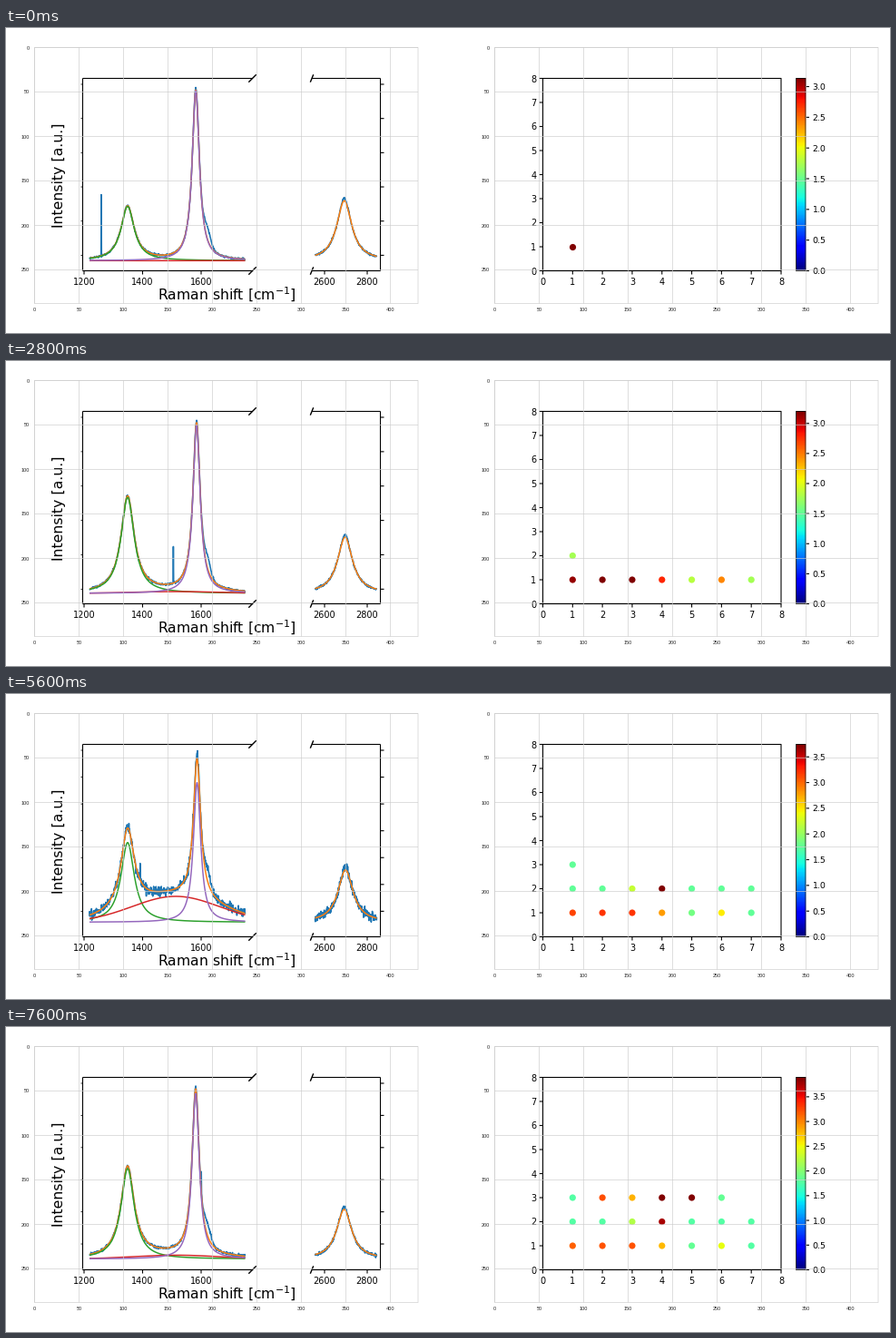
A matplotlib script that plays this animation: 974x336 px, repeating every 8 s.

```python
import numpy as np
import matplotlib.pyplot as plt
from matplotlib.animation import FuncAnimation

W, H, DPI = 974, 336, 100
FRAMES, INTERVAL = 20, 400
PX = 72 / DPI
TOP, BOTTOM = 55.5, 267.5
COLS = 7

# Regions of a high peak ratio: column, row, rise, half width
GRAINS = [(2.3, 1, 1.45, 1.9), (6, 1, 0.7, 0.5), (3.7, 2, 2.0, 0.6),
          (2.4, 3, 1.5, 0.65), (4.5, 3, 2.15, 1.0)]

fig = plt.figure(figsize=(W / DPI, H / DPI), dpi=DPI, facecolor="white")
ax = fig.add_axes([0, 0, 1, 1])


def line(x, y, color="black", width=1.1, z=3, **kw):
    ax.plot(x, y, color=color, lw=width * PX, zorder=z, snap=False,
            solid_capstyle="butt", solid_joinstyle="round", **kw)


def box(x0, x1, y0, y1, **kw):
    line([x0, x1, x1, x0, x0], [y0, y0, y1, y1, y0], **kw)


def label(x, y, text, size=9.8, ha="center", font="DejaVu Sans", **kw):
    ax.text(x, y, text, fontsize=size * PX, ha=ha, family=font, zorder=4,
            va=kw.pop("va", "center_baseline"), **kw)


def lorentz(x, center, height, half_width):
    return height / (1 + ((x - center) / half_width) ** 2)


def gauss(x, center, height, sd):
    return height * np.exp(-((x - center) / sd) ** 2 / 2)


def cell(n):
    return n % COLS + 1, n // COLS + 1


def peak_ratio(n):
    """Height ratio of the two main peaks at the n-th map position."""
    col, row = cell(n)
    return 1.75 + sum((row == r) * rise / (1 + ((col - c) / half) ** 8)
                      for c, r, rise, half in GRAINS)


def outer_panel(x0):
    x1, y0, y1 = x0 + 422.5, 21.5, 303.5
    grid = dict(color="#cccccc", width=0.8, z=6, alpha=0.8)
    small = dict(size=5.5, font="Liberation Sans", color="#262626")
    box(x0, x1, y0, y1, **grid)
    for v in range(0, 401, 50):
        x, y = x0 + 0.98 * v, y0 + 0.98 * v
        line([x, x], [y0, y1], **grid)
        label(x, 310.5, str(v), **small)
        if y < y1:
            line([x0, x1], [y, y], **grid)
            label(x0 - 6, y, str(v), ha="right", **small)


def spectrum_axes(tick_step):
    for x0, x1, slash_x, dx in ((84.5, 271.5, 271.5, 4.2),
                                (337, 412.5, 337, 1.7)):
        for y in (TOP, BOTTOM):
            line([x0, x1], [y, y])
            line([slash_x - dx, slash_x + dx], [y + 4.2, y - 4.2], width=1.4)
    for x in (84.5, 412.5):
        line([x, x], [TOP, BOTTOM])
    for y in np.arange(62, BOTTOM, tick_step):
        line([412.5, 416.5], [y, y])
        line([82.5, 84.5], [y, y], width=0.8)
    for origin, start, scale, values in ((86, 1200, 0.3225, (1200, 1400, 1600)),
                                         (351, 2600, 0.235, (2600, 2800))):
        for v in values:
            x = origin + (v - start) * scale
            line([x, x], [BOTTOM, BOTTOM + 4])
            label(x, 279, str(v))
    label(58, 162.5, "Intensity [a.u.]", 15.7, rotation=90, va="center")
    label(243, 294, "Raman shift [cm$^{-1}$]", 15.6, va="center")


def spectrum(i, rng):
    # The broad background swells and fades, and brings noise with it.
    swell = gauss(i, 13.5, 29, 2.8)
    shift = 0.9 * np.sin(2 * np.pi * (i - 3.4) / 8.3)
    base = 256.3 - 0.17 * swell
    noise = 0.6 + 0.07 * swell
    g_x, two_d_x = 209.6 + shift, 373.2 + shift
    g_height = base - 69 - swell

    x = np.linspace(92, 263.5, 530)
    d = lorentz(x, 134, g_height / peak_ratio(i), 8.8)
    g = lorentz(x, g_x, g_height, 4.8)
    hump = gauss(x, 187, swell, 48)
    fit = d + g + hump
    excess = max(base - 66 - fit.max(), 0)
    raw = fit + gauss(x, 222, 14, 3.5) + gauss(x, g_x, excess, 2)

    x2 = np.linspace(340.5, 408.5, 290)
    fit2 = lorentz(x2, two_d_x, 66 - 0.6 * i, 10)
    raw2 = fit2 + gauss(x2, two_d_x, 2 + noise, 2.5)

    raw[rng.integers(30, 500)] += rng.uniform(15, 70)
    for xs, ys, model in ((x, raw, fit), (x2, raw2, fit2)):
        line(xs, base - ys - rng.normal(0, noise, xs.size), "tab:blue", 1.6)
        line(xs, base - model, "tab:orange", 1.5)
    for part, color in ((d, "green"), (hump, "red"), (g, "purple")):
        line(x, base - part, "tab:" + color, 1.5)


def ratio_map(i):
    x0, x1 = 591.5, 854
    dx, dy = (x1 - x0) / 8, (BOTTOM - TOP) / 8
    box(x0, x1, TOP, BOTTOM)
    for v in range(9):
        x, y = x0 + v * dx, BOTTOM - v * dy
        line([x, x], [BOTTOM, BOTTOM + 4])
        line([x0 - 4, x0], [y, y])
        label(x, 279, str(v))
        label(x0 - 7, y, str(v), ha="right")

    values = [peak_ratio(n) for n in range(i + 1)]
    vmax = max(values)
    col, row = cell(np.arange(i + 1))
    ax.scatter(x0 + col * dx, BOTTOM - row * dy, c=values, cmap="jet",
               vmin=0, vmax=vmax, s=(7.2 * PX) ** 2, linewidths=0, zorder=4)

    left, right = 870.5, 881
    ax.imshow(np.linspace(1, 0, 256)[:, None], cmap="jet", aspect="auto",
              extent=(left, right, BOTTOM, TOP), zorder=2)
    box(left, right, TOP, BOTTOM, width=0.8)
    for v in np.arange(0, vmax, 0.5):
        y = BOTTOM - (BOTTOM - TOP) * v / vmax
        line([right, right + 4], [y, y])
        label(888, y, f"{v:.1f}", 9.4, ha="left")


def draw(i):
    ax.clear()
    rng = np.random.default_rng(40 + i)
    outer_panel(31.5)
    outer_panel(538.5)
    spectrum_axes(rng.uniform(26, 42))
    spectrum(i, rng)
    ratio_map(i)
    ax.set(xlim=(0, W), ylim=(H, 0))
    ax.axis("off")
    return []


anim = FuncAnimation(fig, draw, frames=FRAMES, interval=INTERVAL,
                     init_func=lambda: [], repeat=True, repeat_delay=0)
plt.show()
```
